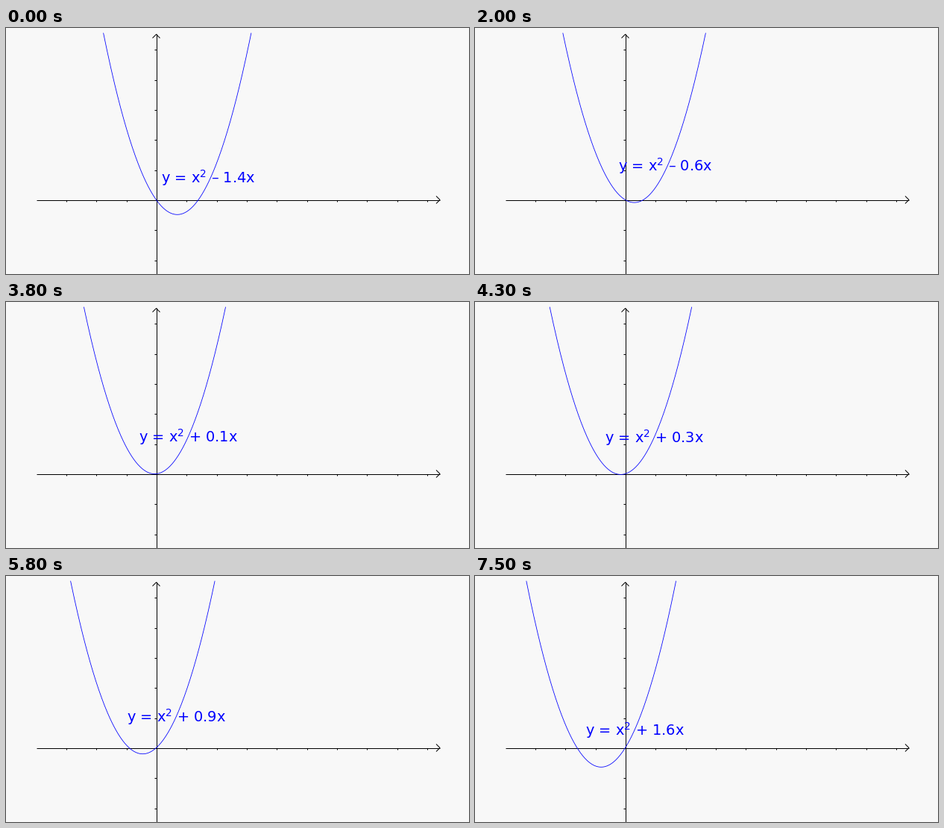
Write a matplotlib script that moves like this. It is 621x330 px and loops after 7.6 s.

```python
import matplotlib.pyplot as plt
import numpy as np
from matplotlib.animation import FuncAnimation

W, H, DPI = 621, 330, 96
PX = 72 / DPI  # one pixel in points
OX, OY, UNIT = 201.5, 230.5, 40.35  # origin and scale of the graph in pixels
TOP = 7
BLUE = "#0000ff"

plt.rcParams.update({
    "font.family": "DejaVu Sans",
    "mathtext.fontset": "dejavusans",
    "mathtext.default": "regular",
})

# How many frames each coefficient from -1.4 to 1.6 stays
holds = [3, 2] * 6 + [3] + [3, 2] * 5 + [2] + [3, 2] * 3 + [1]
tenths = np.repeat(np.arange(-14, 17), holds)

fig = plt.figure(figsize=(W / DPI, H / DPI), dpi=DPI, facecolor="#f8f8f8")
ax = fig.add_axes([0, 0, 1, 1])
ax.set(xlim=(0, W), ylim=(H, 0))
ax.axis("off")


def stroke(xs, ys):
    ax.plot(xs, ys, color="black", lw=PX, solid_capstyle="butt",
            solid_joinstyle="miter")


def draw_axes():
    stroke([41, 582], [OY, OY])
    stroke([OX, OX], [8, H])
    stroke([577, 582, 577], [OY - 5, OY, OY + 5])
    stroke([OX - 5, OX, OX + 5], [13.5, 8.5, 13.5])
    for k in range(-3, 10):
        x = OX + round(k * UNIT)
        stroke([x, x], [OY, OY + 2.5])
    for k in range(-2, 6):
        y = OY - round(k * UNIT)
        stroke([OX - 2.5, OX], [y, y])


def equation(n):
    text = r"y = $\mathrm{x}^2$"
    if n:
        factor = "" if abs(n) == 10 else f"{abs(n) / 10:.1f}"
        text += f" {'+' if n > 0 else '–'} {factor}x"
    return text


draw_axes()
curve, = ax.plot([], [], color=BLUE, lw=0.8 * PX, zorder=3)
label = ax.text(0, 0, "", color=BLUE, fontsize=19.4 * PX, zorder=4,
                ha="left", va="baseline")


def update(frame):
    n = int(tenths[frame])
    b = n / 10
    low = -b * b / 4
    half = np.sqrt((OY - TOP) / UNIT - low)
    x = np.linspace(-half, half, 200) - b / 2
    curve.set_data(OX + UNIT * x, OY - UNIT * (x * x + b * x))
    label.set_text(equation(n))
    label.set_position((OX - UNIT * b / 2 - 21.5, OY - UNIT * low - 42.8))
    return curve, label


anim = FuncAnimation(fig, update, frames=len(tenths), interval=100,
                     repeat=True, repeat_delay=0)
plt.show()
```
